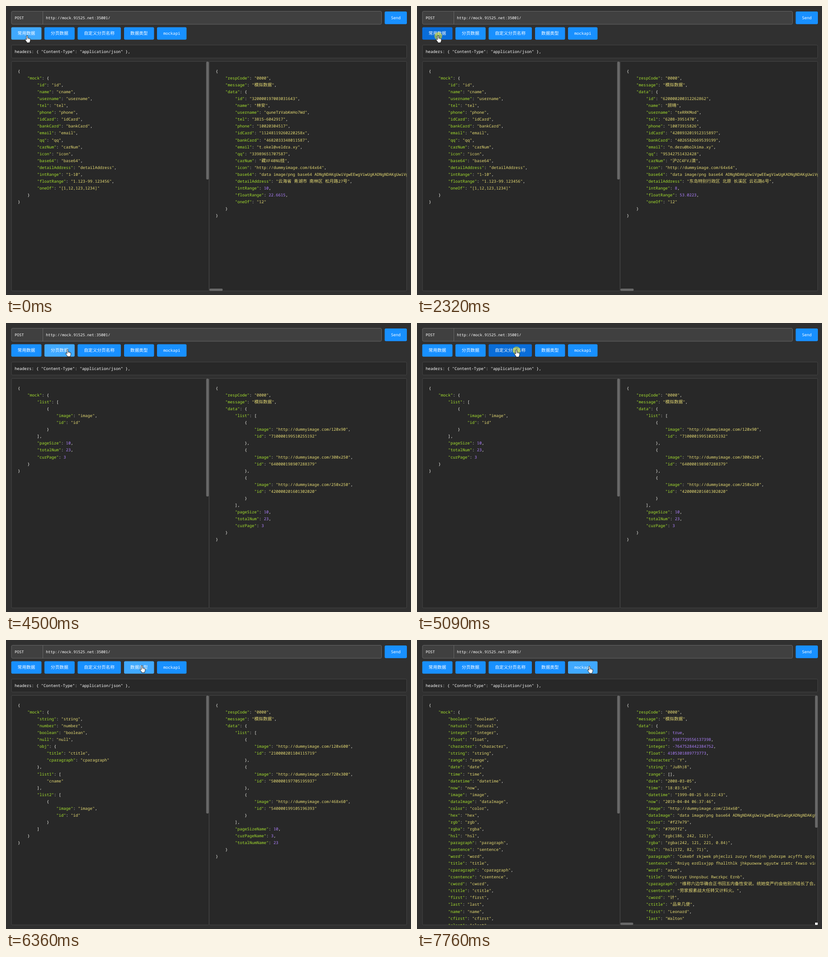
Recreate the animation shown at these times as an HTML page. Size 885 px wide and 633 px high, loop 8 s.

```html
<!DOCTYPE html>
<html lang="zh">
<head>
<meta charset="utf-8">
<title>Mock data demo</title>
<style>
html, body { margin: 0; width: 100%; height: 100%; overflow: hidden; background: #303030; }
svg { display: block; width: 885px; height: 633px; }
text { font: 500 8.78px 'Noto Sans Mono', 'DejaVu Sans Mono', monospace; fill: #fff; white-space: pre; text-rendering: geometricPrecision; }
.cjk { font: 400 9.58px 'Noto Sans CJK SC', 'Noto Sans CJK JP', sans-serif; }
.input { font-size: 8.37px; }
.mid { text-anchor: middle; }
.code text { fill: #f8f8f2; }
.key { fill: #a6e22e; }
.str { fill: #e6db74; }
.num { fill: #ae81ff; }
.panel { fill: #282828; stroke: #444; }
.field { fill: #404040; stroke: #666; }
.thumb { fill: #686868; }
</style>
</head>
<body>
<svg viewBox="0 0 885 633">
  <clipPath id="clipL"><rect x="12" y="122" width="425.5" height="502"/></clipPath>
  <clipPath id="clipR"><rect id="viewR" x="445" y="122" width="431" height="502"/></clipPath>
  <rect width="885" height="633" fill="#303030"/>
  <rect class="field" x="12" y="11.5" width="808.5" height="28.5" rx="2.5"/>
  <path class="field" d="M80.5 11.5V40"/>
  <text class="input" x="19" y="29">POST</text>
  <text class="input" x="87.3" y="29">http://mock.91525.net:35001/</text>
  <rect x="827.5" y="12" width="48.5" height="27.7" rx="2.7" fill="#1890ff"/>
  <text class="mid" x="851.7" y="29">Send</text>
  <g id="buttons"></g>
  <rect class="panel" x="12" y="85.5" width="863.5" height="28.5" rx="2"/>
  <text x="19" y="102.8">headers: { "Content-Type": "application/json" },</text>
  <rect class="panel" x="12" y="121.5" width="431.5" height="502.5" rx="2"/>
  <rect class="panel" x="444" y="121.5" width="431.5" height="502.5" rx="2"/>
  <g clip-path="url(#clipL)"><g class="code" id="left"></g></g>
  <g clip-path="url(#clipR)"><g class="code" id="right"></g></g>
  <rect class="thumb" x="437.5" y="122" width="5.5" height="258" rx="2"/>
  <rect class="thumb" id="barH" x="444.5" y="619" width="29" height="5" rx="2"/>
  <rect class="thumb" id="barV" x="869.8" y="122" width="5.7" height="0" rx="2"/>
  <rect id="corner" x="870" y="619" width="5.5" height="5" fill="#fff"/>
  <g id="cursor">
    <circle id="halo" cx=".5" cy="1" r="8.5" fill="#ffeb00" fill-opacity=".5"/>
    <path fill="#fff" stroke="#111" stroke-width=".9" stroke-linejoin="round" d="M-1.3 9V1Q-1.3 -.3 0 -.3T1.3 1V5.2Q2.6 4.6 3.4 5.8 4.7 5 5.4 6.4 7 6 7.2 7.6V10.5Q7 12.5 6 13.6V15.5H-.6V14Q-2 12.3 -4 9.2 -4.6 7.8 -3.4 7.6 -2.4 7.6 -1.3 9Z"/>
    <path stroke="#222" stroke-width=".5" d="M1.3 5.5V8M3.4 6V8.2M5.4 6.6V8.4"/>
  </g>
</svg>
<script>
const LOOP = 8000;
const el = id => document.getElementById(id);
const set = (id, attrs) => { for (const k in attrs) el(id).setAttribute(k, attrs[k]); };

// ---- JSON documents ----
const mirror = words => Object.fromEntries(words.split(' ').map(w => [w, w]));
const reply = data => ({ respCode: '0000', message: '模拟数据', data });
const letters = 'ANSUhEUgAADwACMiVBORwKGgo';
const filler = Array.from({ length: 40 }, (_, i) => letters[(i * i * 3 + i * 7) % letters.length]).join('');
const imageText = 'data image/png base64 ' + filler;
const pic = (size, id) => ({ image: 'http://dummyimage.com/' + size, id });

const person = (id, name, username, tel, phone, idCard, bankCard, email, qq, carNum, detailAddress, intRange, floatRange, oneOf) =>
  reply({ id, name, username, tel, phone, idCard, bankCard, email, qq, carNum,
    icon: 'http://dummyimage.com/64x64', base64: imageText, detailAddress, intRange, floatRange, oneOf });

const people = [
  person('320000197003031643', '林安', 'quneTrVabKmHo7Wd', '3815-6042917', '10020304517', '11248119260220258x', '4682033348011587',
    't.okel@veldra.xy', '33989651707587', '藏XF40NU挂', '云海省 青湖市 南林区 松月路27号', 10, 22.6615, '12'),
  person('520000197609152340', '程禾', 'HRTOMlq4_VNua', '4406-1937528', '10058263194', '61362820570120866X', '4100624295288306',
    'm.tulervisod@hanbeldor.xy', '97385888624', '桂PZW3LQ警', '远方 远方 - 竹溪路31号', 1, 97.685, '123'),
  person('620000200312262862', '顾晴', 'teRRKMod', '6208-3951470', '10073915826', '420893201912315897', '4026582669539199',
    'n.deru@bolkima.xy', '95342751432428', '沪ZC4FVJ澳', '东岛特别行政区 北原 长溪区 云石路6号', 8, 53.0223, '12'),
  person('230000198803269644', '叶舟', 'NORIbetu', '7350-2864193', '10081472953', '717226208910227206', '6225986823417824',
    's.holm@tarvendik.xy', '4940354140394', '黑JCFB6A挂', '临山省 清川市 白溪青族云林族自治县 晴波路46号', 8, 18.624, '12')
];

const row = mirror('image id');
const common = { mock: {
  id: 'id', name: 'cname', ...mirror('username tel phone idCard bankCard email qq carNum icon base64 detailAddress'),
  intRange: '1-10', floatRange: '1.123-99.123456', oneOf: '[1,12,123,1234]' } };
const paged = { mock: { list: [row], pageSize: 10, totalNum: 23, curPage: 3 } };
const renamed = {
  ...paged,
  paging: { list: 'list', pageSize: 'pageSizeName', curPage: 'curPageName', totalNum: 'totalNumName' } };
const types = { mock: { ...mirror('string number boolean null'),
  obj: { title: 'ctitle', cparagraph: 'cparagraph' }, list1: ['cname'], list2: [row] } };
const api = { mock: mirror('boolean natural integer float character string range date time datetime now image dataImage ' +
  'color hex rgb rgba hsl paragraph sentence word title cparagraph csentence cword ctitle first last name cfirst clast cname') };

const pagedReply = reply({
  list: [pic('120x90', '710000199510255192'), pic('300x250', '640000198907288379'), pic('250x250', '420000201601302020')],
  pageSize: 10, totalNum: 23, curPage: 3 });
const renamedReply = reply({
  list: [pic('120x600', '210000201104115719'), pic('720x300', '500000197705195937'), pic('468x60', '540000199105196393')],
  pageSizeName: 10, curPageName: 3, totalNumName: 23 });
const sizes = ['120x90', '300x250', '468x60', '720x300'];
const typesReply = reply({
  string: 'kT5w]q', number: 4628, boolean: true, null: null,
  obj: { title: '山水有光', cparagraph: '天上云来山下水明月光林木成行。人在路中见花开又见风起日落。江河长流不息四时和顺年年有余。' },
  list1: ['林安', '程禾', '顾晴', '叶舟', '沈禾', '江远', '白溪', '陆青'],
  list2: Array.from({ length: 10 }, (_, i) => pic(sizes[i * 3 % 4], `${31 + i * 2}0000199${i}0${1 + i % 9}1${i}${2317 + i * 641}`))
});
const apiReply = reply({
  boolean: true, natural: 5987729556137398, integer: -7647528442384752, float: 4105301889773773,
  character: 'Y', string: 'Ju8h)8', range: [], date: '2008-03-05', time: '18:03:54',
  datetime: '1999-08-25 16:22:43', now: '2019-04-04 06:37:46', image: 'http://dummyimage.com/234x60', dataImage: imageText,
  color: '#f27e79', hex: '#7997f2', rgb: 'rgb(186, 242, 121)', rgba: 'rgba(242, 121, 221, 0.84)', hsl: 'hsl(172, 82, 71)',
  paragraph: 'Cokebf rkjwek phjeclzi zuzyv ftedjnh ybdxrpm acyfft qojq tuvel.',
  sentence: 'Rniyq erdlsxjpp fhallthlk jhkpuowxw ugyutw rimtc fxwso vimt okel.',
  word: 'arve', title: 'Oooivyr Unnpsbuc Rwcrkpc Ernb',
  cparagraph: '维称六边华确合正书回五内备性安说。统她变严约会他别济结长了合。',
  csentence: '劳家报素战大任转又计料火。', cword: '计', ctitle: '品来几便', first: 'Leonard', last: 'Walton' });

// ---- timeline ----
const leftDocs = [[0, common], [3480, paged], [5260, renamed], [6360, types], [7590, api]];
// time, document, horizontal thumb width, vertical thumb height
const rightDocs = [
  [0, people[0], 29, 0], [930, people[1], 29, 0], [1870, people[2], 29, 0], [2710, people[3], 29, 0],
  [3630, pagedReply, 0, 0], [5410, renamedReply, 0, 0], [6520, typesReply, 180, 243], [7760, apiReply, 28, 289]];
const spots = [[46, 65], [114, 58], [217, 59], [297, 56], [377, 57.5]];
// first step, last step, number of steps
const moves = [[2940, 3095, 3], [4500, 4790, 5], [5640, 6040, 6], [6830, 7120, 5]];
// press begins, fully pressed, released
const presses = [[520, 610, 750], [1540, 1540, 1690], [2320, 2320, 2480], [3172, 3250, 3480],
  [5090, 5090, 5260], [6120, 6200, 6360], [7290, 7370, 7590]];
const buttons = [[11.5, 66, '常用数据'], [84, 66, '分页数据'], [156.5, 94.5, '自定义分页名称'], [258, 65.5, '数据类型'], [330, 64.5, 'mockapi']];

// ---- drawing ----
const esc = s => s.replace(/&/g, '&amp;').replace(/</g, '&lt;');
const withCjk = s => esc(s).replace(/[\u3000-\u9fff]+/g, '<tspan class="cjk">$&</tspan>');
const span = (cls, s) => `<tspan class="${cls}">${withCjk(s)}</tspan>`;
const token = /("[^"]*")(?=:)|("[^"]*")|(-?\d[\d.]*|\btrue\b|\bfalse\b|\bnull\b)/g;
const colour = line => line.replace(token, (m, key, str) => span(key ? 'key' : str ? 'str' : 'num', m));

function drawDoc(id, x, doc) {
  el(id).innerHTML = JSON.stringify(doc, null, 4).split('\n').slice(0, 34)
    .map((line, i) => `<text x="${x}" y="${(146 + i * 15.05).toFixed(2)}">${colour(line)}</text>`).join('');
}

el('buttons').innerHTML = buttons.map(([x, w, label], i) =>
  `<rect id="btn${i}" x="${x}" y="46.5" width="${w}" height="27.2" rx="2.7"/>` +
  `<text class="mid" x="${x + w / 2}" y="63.2">${withCjk(label)}</text>`).join('');

const latest = (list, t) => list.reduce((a, e, i) => t >= e[0] ? i : a, 0);
const shown = { left: -1, right: -1 };

function cursorAt(t) {
  let pos = spots[0];
  moves.forEach(([from, to, n], i) => {
    if (t < from) return;
    const step = Math.min(n, 1 + Math.floor((t - from) / (to - from) * (n - 1)));
    pos = spots[i].map((v, k) => v + (spots[i + 1][k] - v) * step / n);
  });
  return pos;
}

function render(t) {
  const l = latest(leftDocs, t), r = latest(rightDocs, t);
  if (l !== shown.left) drawDoc('left', 25.8, leftDocs[shown.left = l][1]);
  if (r !== shown.right) {
    const [, doc, h, v] = rightDocs[shown.right = r];
    drawDoc('right', 458.3, doc);
    set('barH', { width: h });
    set('barV', { height: v });
    set('viewR', { width: v ? 424.8 : 431, height: h ? 497 : 502 });
    set('corner', { visibility: v ? 'visible' : 'hidden' });
  }
  const [x, y] = cursorAt(t);
  const press = presses.find(p => t >= p[0] && t < p[2]);
  const hot = press ? (t < press[1] ? '#258bec' : '#096dd9') : '#40a9ff';
  buttons.forEach(([bx, w], i) => set('btn' + i, { fill: x >= bx && x <= bx + w ? hot : '#1890ff' }));
  set('cursor', { transform: `translate(${x} ${y})` });
  set('halo', { visibility: press ? 'visible' : 'hidden' });
}

const start = performance.now();
function tick() {
  render((performance.now() - start) % LOOP);
  requestAnimationFrame(tick);
}
tick();
</script>
</body>
</html>
```
